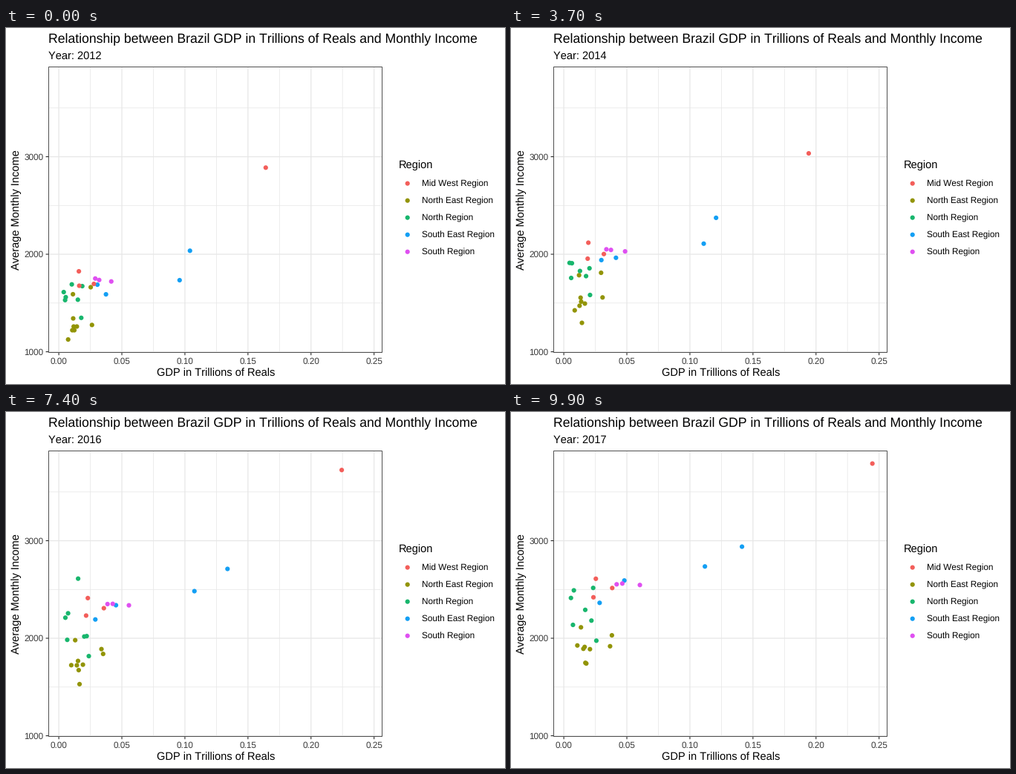
These frames come from a looping animation (672 by 480 pixels, 10000 ms). A matplotlib script:

```python
import matplotlib.pyplot as plt
import numpy as np
from matplotlib.animation import FuncAnimation

W, H, DPI = 672, 480, 96
FRAMES, INTERVAL = 100, 100
LEFT, RIGHT, TOP, BOTTOM = 57.3, 507.1, 52.0, 437.5
INK, TICK, TICK_TEXT = "#000000", "#222222", "#3a3a3a"
GRID, BORDER = "#e7e7e7", "#505050"
MAJOR, MINOR = 1.25, 0.75
FIRST_YEAR, LAST_YEAR = 2012, 2017
GROWTH = 1.45  # typical rise of a state's GDP over the whole period
REGIONS = {
    "Mid West": "#f35e5a",
    "North East": "#929406",
    "North": "#18b66d",
    "South East": "#139ff4",
    "South": "#df50f1",
}

plt.rcParams.update({
    "font.family": "Liberation Sans",
    "text.hinting": "none",
    "text.kerning_factor": 6,
})

states = []


def state(region, gdp, *income):
    """Add a dot whose GDP (billions) and income pass evenly spaced key points.

    A single GDP figure is the first year's and grows by GROWTH.
    """
    if np.isscalar(gdp):
        gdp = (gdp, gdp * GROWTH)
    states.append((REGIONS[region], np.array(gdp) / 1000, income))


# Drawing order is alphabetical by state name.
state("North", 5.0, 1530, 2137)
state("North East", 11.8, 1259, 1600, 1748)
state("North", 5.5, 1560, 2491)
state("North", (18.6, 23.3), 1673, 1810, 1863, 1935, 2053, 2516)
state("North East", 26.3, 1275, 2030)
state("North East", 14.3, 1259, 1888)
state("Mid West", (164.1, 244.7), 2888, 3056, 3031, 3553, 3786, 3791)
state("South East", (30.6, 28.4), 1688, 2363)
state("Mid West", (27.8, 38.4), 1696, 2515)
state("North East", 12.3, 1221, 1322, 1741)
state("Mid West", (15.9, 25.4), 1825, 2610)
state("Mid West", 16.2, 1677, 2420)
state("South East", (37.4, 48.0), 1589, 2592)
state("North", 17.8, 1348, 1975)
state("North East", 10.7, 1221, 1892)
state("South", 28.9, 1751, 2553)
state("North East", 25.3, 1662, 1860, 1918)
state("North East", 7.4, 1126, 1926)
state("South East", (95.8, 104.7, 111.9, 109.9, 106.7, 111.9), 1734, 2736)
state("North East", 11.4, 1342, 1911)
state("South", 41.6, 1721, 2546)
state("North", 15.1, 1534, 2181)
state("North", 3.9, 1612, 2413)
state("South", 32.0, 1736, 2561)
state("South East", (104.0, 126.4, 141.3), 2036, 2939)
state("North East", (11.2, 13.6), 1590, 2112)
state("North", (10.3, 17.0), 1691, 1837, 1827, 2373, 2696, 2291)

colors, gdps, incomes = zip(*states)


def limits(paths):
    values = np.concatenate(paths)
    lo, hi = values.min(), values.max()
    pad = 0.05 * (hi - lo)
    return lo - pad, hi + pad


X_LIM, Y_LIM = limits(gdps), limits(incomes)


def px(x):
    return np.interp(x, X_LIM, (LEFT, RIGHT))


def py(y):
    return np.interp(y, Y_LIM, (BOTTOM, TOP))


def along(paths, t):
    return [np.interp(t, np.linspace(0, 1, len(p)), p) for p in paths]


fig = plt.figure(figsize=(W / DPI, H / DPI), dpi=DPI, facecolor="white")
ax = fig.add_axes([0, 0, 1, 1])
ax.set(xlim=(0, W), ylim=(H, 0))
ax.axis("off")


def line(xs, ys, color, width, z):
    ax.plot(xs, ys, color=color, lw=width * 72 / DPI, zorder=z,
            snap=False, solid_capstyle="butt")


def label(x, y, text, size, color=INK, **kw):
    return ax.text(x, y, text, size=size, color=color, va="baseline", **kw)


def dots(x, y, c):
    return ax.scatter(x, y, s=21.6, c=c, linewidths=0, zorder=3)


def v_grid(x, width):
    line([px(x)] * 2, [TOP, BOTTOM], GRID, width, 1)


def h_grid(y, width):
    line([LEFT, RIGHT], [py(y)] * 2, GRID, width, 1)


for x in np.arange(0.025, 0.25, 0.05):
    v_grid(x, MINOR)
for y in (1500, 2500, 3500):
    h_grid(y, MINOR)
for x in np.arange(6) * 0.05:
    v_grid(x, MAJOR)
    line([px(x)] * 2, [BOTTOM, BOTTOM + 3.7], TICK, 1.07, 4)
    label(px(x), 453, f"{x:.2f}", 8.8, TICK_TEXT, ha="center")
for y in (1000, 2000, 3000):
    h_grid(y, MAJOR)
    line([LEFT - 3.7, LEFT], [py(y)] * 2, TICK, 1.07, 4)
    label(50.7, py(y) + 4.2, f"{y}", 8.8, TICK_TEXT, ha="right")
ax.add_patch(plt.Rectangle((57.5, 52.5), 449, 385, fill=False, ec=BORDER,
                           lw=72 / DPI, zorder=5, snap=False))

label(LEFT, 19.4, "Relationship between Brazil GDP in Trillions of Reals"
      " and Monthly Income", 13.2)
subtitle = label(LEFT, 41.7, "", 11)
label((LEFT + RIGHT) / 2, 470, "GDP in Trillions of Reals", 11, ha="center")
label(17.9, (TOP + BOTTOM) / 2, "Average Monthly Income", 11, ha="center",
      rotation=90, rotation_mode="anchor")

label(529.1, 189.2, "Region", 11)
rows = 209.6 + 23.04 * np.arange(len(REGIONS))
dots([540.7] * len(rows), rows, list(REGIONS.values()))
for y, name in zip(rows, REGIONS):
    label(559.5, y + 4.2, f"{name} Region", 8.8)

points = dots(px(along(gdps, 0)), py(along(incomes, 0)), colors)


def update(i):
    t = i / (FRAMES - 1)
    points.set_offsets(np.column_stack([px(along(gdps, t)), py(along(incomes, t))]))
    subtitle.set_text(f"Year: {round(FIRST_YEAR + (LAST_YEAR - FIRST_YEAR) * t)}")
    return points, subtitle


anim = FuncAnimation(fig, update, frames=FRAMES, interval=INTERVAL,
                     init_func=lambda: update(0), repeat=True, repeat_delay=0)
plt.show()
```
